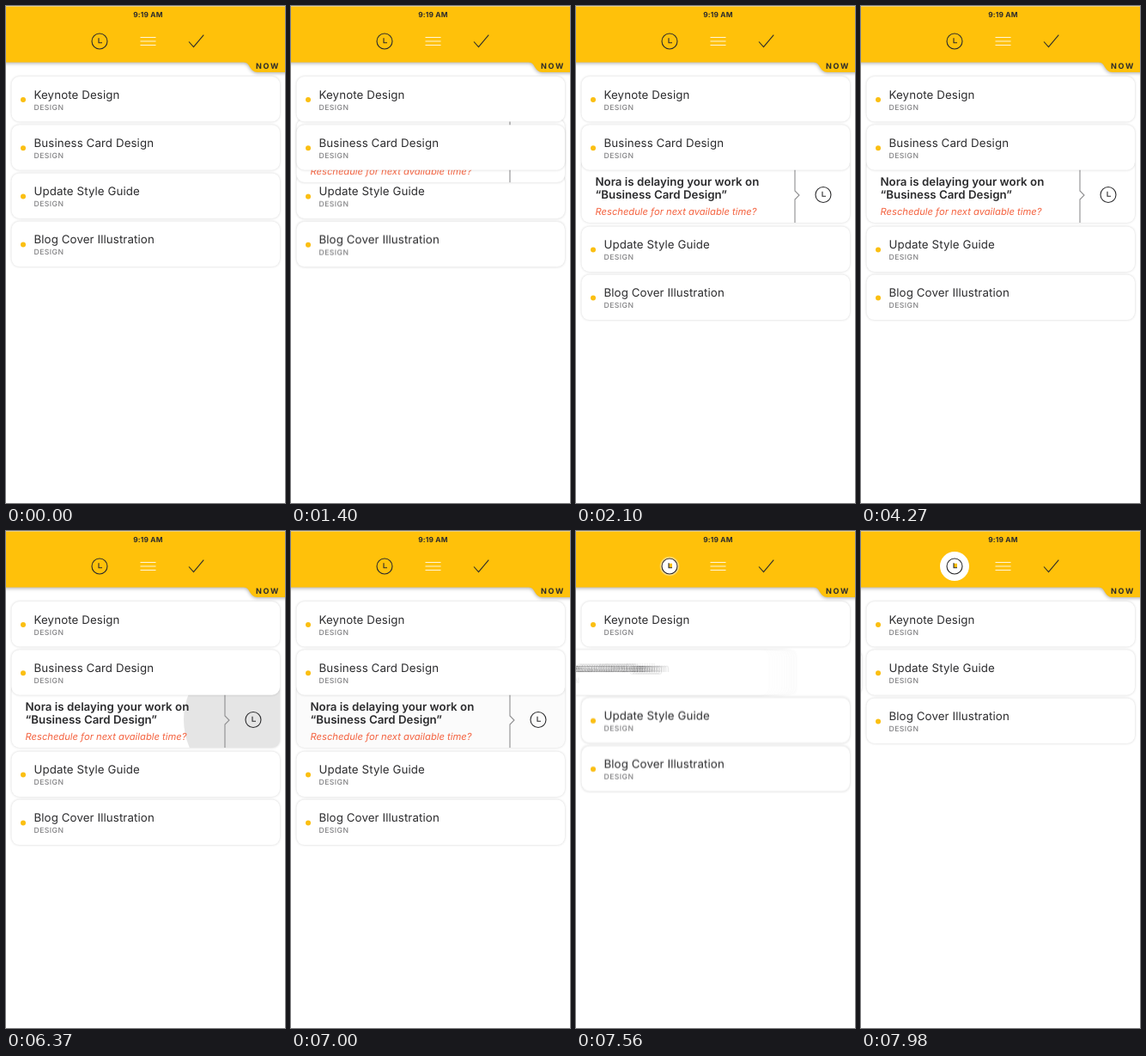
An HTML page with a canvas that plays this animation: 325x578 px, repeating every 8000 ms.

```html
<!DOCTYPE html>
<html lang="en">
<head>
<meta charset="utf-8">
<title>Task list</title>
<style>
  html, body { margin: 0; width: 100%; height: 100%; overflow: hidden; background: #fff; }
  canvas { display: block; width: 325px; height: 578px; }
</style>
</head>
<body>
<canvas id="stage"></canvas>
<script>
const W = 325, H = 578, LOOP = 8000, STEP = 70;
const SHUTTER = 40, SAMPLES = 12;
const YELLOW = '#ffc10a', INK = '#2b2b2d';
const CARD = { x: 6.5, y: 82, w: 312.5, h: 52.5, r: 9, pitch: 56.2 };
const PANEL = { y: 178, h: 74, lift: 47, push: 62 };
const TASKS = ['Keynote Design', 'Business Card Design', 'Update Style Guide', 'Blog Cover Illustration'];

const dpr = window.devicePixelRatio || 1;
const stage = document.getElementById('stage');
const buffer = document.createElement('canvas');
for (const c of [stage, buffer]) {
  c.width = W * dpr;
  c.height = H * dpr;
}
const out = stage.getContext('2d');
const g = buffer.getContext('2d');
g.scale(dpr, dpr);
g.textRendering = 'geometricPrecision';

const ramp = (t, from, to) => Math.min(1, Math.max(0, (t - from) / (to - from)));
const ease = (t, from, to) => {
  const u = ramp(t, from, to);
  return u * u * (3 - 2 * u);
};

function text(str, x, y, font, color, spacing = 0, align = 'left') {
  g.font = font + ' Inter, sans-serif';
  g.letterSpacing = spacing + 'px';
  g.textAlign = align;
  g.fillStyle = color;
  g.fillText(str, x, y);
}

function line(points, color, width) {
  g.beginPath();
  points.forEach(([x, y]) => g.lineTo(x, y));
  g.strokeStyle = color;
  g.lineWidth = width;
  g.stroke();
}

function disc(x, y, r, color) {
  g.beginPath();
  g.arc(x, y, r, 0, Math.PI * 2);
  g.fillStyle = color;
  g.fill();
}

function shadow(alpha, blur, dy) {
  g.shadowColor = `rgba(0,0,0,${alpha})`;
  g.shadowBlur = blur * dpr;
  g.shadowOffsetY = dy * dpr;
}

function sheet(y, h, strength = 1) {
  g.save();
  shadow(0.18 * strength, 3, 0);
  g.beginPath();
  g.roundRect(CARD.x, y, CARD.w, h, CARD.r);
  g.fillStyle = '#fff';
  g.fill();
  g.restore();
}

function card(i, dx, dy) {
  g.save();
  g.translate(dx, i * CARD.pitch + dy);
  sheet(CARD.y, CARD.h);
  disc(20, 109, 3, '#fbbf12');
  text(TASKS[i], 32.5, 107.6, '400 13.3px', INK, 0.1);
  text('DESIGN', 32.5, 120.8, '500 8.6px', '#808083', 0.45);
  g.restore();
}

function clock(x, y, filled) {
  const hx = x - 1, hy = y + 1.8;
  if (filled) {
    g.fillStyle = YELLOW;
    g.fillRect(hx, hy - 5, 4, 5);
  }
  g.beginPath();
  g.arc(x, y, 9, 0, Math.PI * 2);
  g.strokeStyle = INK;
  g.lineWidth = 1.1;
  g.stroke();
  line([[hx, hy - 5.5], [hx, hy], [hx + 4, hy]], INK, 1.1);
}

function panel(t, m) {
  if (t < 1400 || t >= 7420) return;
  const hidden = 1 - ease(m, 1400, 2100) + ease(m, 7080, 7420);
  const alpha = 1 - ramp(m, 7140, 7410);
  g.save();
  g.translate(0, -PANEL.lift * hidden);
  sheet(PANEL.y, PANEL.h, alpha);
  g.globalAlpha = alpha;
  ripple(t);
  text('Nora is delaying your work on', 22.5, 209.2, '600 13.3px', INK);
  text('“Business Card Design”', 22.5, 224.2, '600 13.3px', INK);
  text('Reschedule for next available time?', 22.5, 243.2, 'italic 400 11.2px', '#f4623f');
  line([[255, 178], [255, 215], [260, 220], [255, 225], [255, 252]], '#8e8e90', 1.1);
  clock(288, 219.5);
  g.restore();
}

function ripple(t) {
  if (t < 6370 || t > 7070) return;
  g.save();
  g.beginPath();
  g.roundRect(CARD.x, PANEL.y, CARD.w, PANEL.h, CARD.r);
  g.clip();
  const alpha = 0.1 * (1 - ramp(t, 6650, 7070));
  disc(288, 219.5, 81 + 205 * ramp(t, 6370, 6650), `rgba(0,0,0,${alpha})`);
  g.restore();
}

function header(m) {
  g.save();
  shadow(0.35, 4, 1);
  g.beginPath();
  g.moveTo(-9, 0.5);
  g.lineTo(-9, 65.6);
  g.lineTo(277, 65.6);
  g.bezierCurveTo(285, 65.6, 283, 77, 293, 77);
  g.lineTo(334, 77);
  g.lineTo(334, 0.5);
  g.fillStyle = YELLOW;
  g.fill();
  g.restore();

  text('9:19 AM', 165.4, 13.4, '700 8.4px', INK, 0.15, 'center');
  text('NOW', 291, 73.1, '700 9px', INK, 1.7);
  const glow = ease(m, 7420, 7700);
  if (glow > 0) disc(109, 41, 17 * glow, '#fff');
  clock(109, 41, glow > 0.5);
  for (const y of [36.5, 41, 45.5]) line([[156.5, y], [174.5, y]], '#fff6dc', 1);
  line([[213, 41.5], [218.5, 47.6], [230.3, 33.6]], INK, 1.05);
}

function scene(t, m) {
  g.fillStyle = '#fff';
  g.fillRect(0, 0, W, H);
  const open = ease(m, 1400, 2100) - ease(m, 7100, 7530);
  const dy = PANEL.push * open - CARD.pitch * ease(m, 7560, 7910);
  card(3, 0, dy);
  card(2, 0, dy);
  panel(t, m);
  card(0, 0, 0);
  card(1, -318 * ease(m, 7420, 7910), 0);
  header(m);
}

// Averages several moments within one shutter interval for motion blur.
function paint(t) {
  const moving = (t >= 1400 && t < 2100) || (t >= 7070 && t < 7920);
  const n = moving ? SAMPLES : 1;
  for (let i = 0; i < n; i++) {
    scene(t, t + SHUTTER * i / n);
    out.globalAlpha = 1 / (i + 1);
    out.drawImage(buffer, 0, 0);
  }
}

let start = null, shown = -1;
function tick(now) {
  if (start === null) start = now;
  const t = Math.floor(((now - start) % LOOP) / STEP) * STEP;
  if (t !== shown) paint(shown = t);
  requestAnimationFrame(tick);
}
paint(0);
requestAnimationFrame(tick);
</script>
</body>
</html>
```
